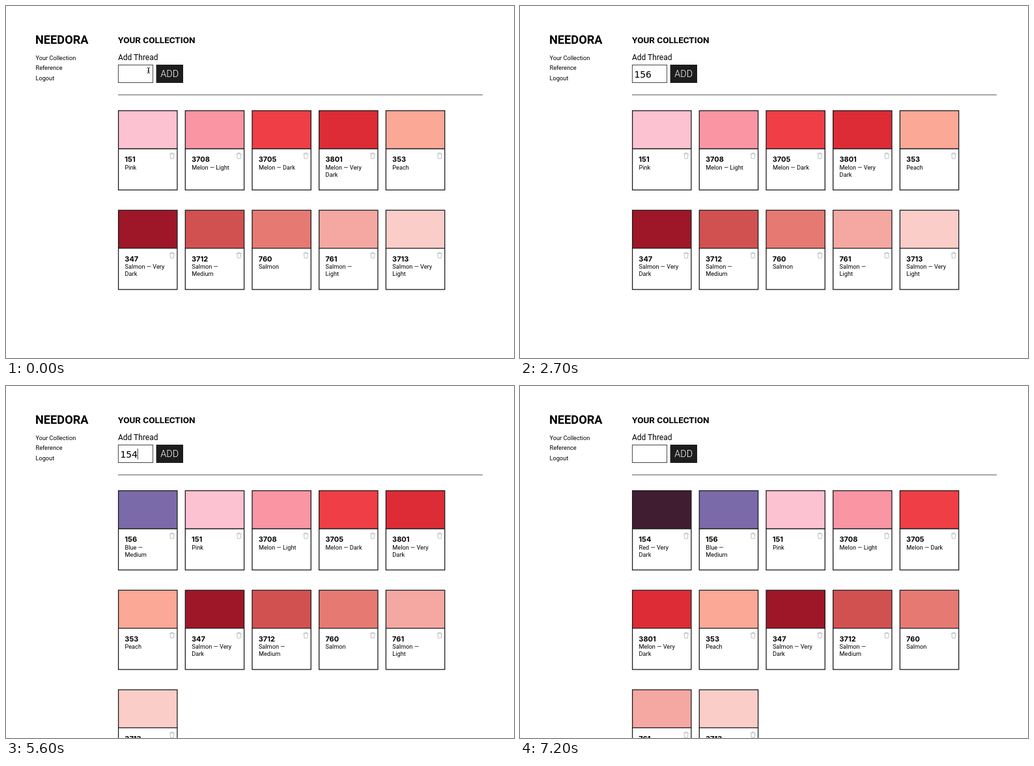
An HTML page for the animation above (7.4 s loop, 780 by 540 pixels).

```html
<!DOCTYPE html>
<html lang="en">
<head>
<meta charset="utf-8">
<title>Your Collection</title>
<style>
  html, body { margin: 0; width: 100%; height: 100%; overflow: hidden; background: #fff; }
  svg { display: block; width: 780px; height: 540px; }
  text { font-family: Roboto, sans-serif; fill: #000; white-space: pre; }
  .brand { font-size: 18.2px; font-weight: 700; }
  .title { font-size: 13.5px; font-weight: 700; }
  .label { font-size: 12px; }
  .small { font-size: 9.2px; }
  .code { font: 700 11px Inter, sans-serif; }
  .add { font-size: 14.4px; font-weight: 300; fill: #fff; }
  .typed { font: 14.8px "DejaVu Sans Mono", monospace; }
  .frame { fill: none; stroke: #1c1c1c; stroke-width: 1.3; }
  .bin { fill: none; stroke: #b0b0b0; stroke-width: .8; }
  .beam { fill: none; stroke: #222; stroke-width: 1; }
</style>
</head>
<body>
<svg viewBox="0 0 780 540">
  <defs>
    <path id="bin" class="bin" d="M79 66.9h8M81.4 66.7v-1.3h3.2v1.3M80.1 67.2l.5 6.9h4.8l.5-6.9"/>
  </defs>

  <text class="brand" x="45" y="58.4">NEEDORA</text>
  <text class="small" x="45.5" y="82.8">Your Collection</text>
  <text class="small" x="45.5" y="98.4">Reference</text>
  <text class="small" x="45.5" y="114">Logout</text>

  <text class="title" x="172" y="57.2">YOUR COLLECTION</text>
  <text class="label" x="172" y="83">Add Thread</text>
  <rect x="172.4" y="90.5" width="53.2" height="27" fill="#fff" stroke="#333" stroke-width=".9"/>
  <rect x="230.6" y="90" width="41.4" height="28" fill="#1d1d1d"/>
  <text class="add" x="251.3" y="109.2" text-anchor="middle">ADD</text>
  <path d="M172 136.3H732" stroke="#444" stroke-width=".9"/>

  <text id="typed" class="typed" x="175.3" y="109.6"></text>
  <rect id="caret" y="96" width="1" height="16.5" fill="#333"/>
  <path id="beam" class="beam" d="M216.6 94.6q2.2 0 2.2 1.4v5.6q0 1.4-2.2 1.4M221 94.6q-2.2 0-2.2 1.4v5.6q0 1.4 2.2 1.4M217.4 99.8h2.8"/>
  <g id="cards"></g>
</svg>
<script>
  const LOOP = 7400, BLINK = 500, DIGIT = 8.9;
  const SHADES = [
    [154, '#411d31', 'Red — Very', 'Dark'],
    [156, '#7b6aa9', 'Blue —', 'Medium'],
    [151, '#fdc2d2', 'Pink'],
    [3708, '#fa95a4', 'Melon — Light'],
    [3705, '#ef3e45', 'Melon — Dark'],
    [3801, '#dd2c35', 'Melon — Very', 'Dark'],
    [353, '#fba896', 'Peach'],
    [347, '#9e1729', 'Salmon — Very', 'Dark'],
    [3712, '#d15150', 'Salmon —', 'Medium'],
    [760, '#e67a73', 'Salmon'],
    [761, '#f5a8a2', 'Salmon —', 'Light'],
    [3713, '#fbcdc9', 'Salmon — Very', 'Light']
  ];
  // time, input value, number of added cards
  const STEPS = [
    [0, '', 0], [400, '', 0],
    [1100, '1', 0], [1500, '15', 0], [1900, '156', 0], [2800, '', 1],
    [3990, '1', 1], [4300, '15', 1], [4500, '154', 1], [5690, '', 2]
  ];

  const byId = id => document.getElementById(id);
  const typed = byId('typed'), caret = byId('caret'), beam = byId('beam');
  const show = (el, on) => el.setAttribute('visibility', on ? 'visible' : 'hidden');

  const cardMarkup = ([code, color, line1, line2 = '']) => `<g>
    <rect x=".6" y=".6" width="90.3" height="58.4" fill="${color}"/>
    <rect class="frame" x=".6" y=".6" width="90.3" height="121.6"/>
    <path class="frame" d="M0 59H91"/>
    <text class="code" x="10.3" y="79.3">${code}</text>
    <text class="small" x="10.5" y="90.5">${line1}</text>
    <text class="small" x="10.5" y="101.5">${line2}</text>
    <use href="#bin"/></g>`;
  byId('cards').innerHTML = SHADES.map(cardMarkup).join('');
  const cards = [...byId('cards').children];

  function layout(added) {
    cards.forEach((card, i) => {
      const slot = i - 2 + added;
      show(card, slot >= 0);
      const x = 172 + (slot % 5) * 102.7, y = 160 + Math.floor(slot / 5) * 152.7;
      card.setAttribute('transform', `translate(${x} ${y})`);
    });
  }

  let current = -1;
  function draw(now) {
    const t = now % LOOP;
    const index = STEPS.findLastIndex(step => step[0] <= t);
    const [start, value, added] = STEPS[index];
    if (index !== current) {
      current = index;
      typed.textContent = value;
      caret.setAttribute('x', 175 + value.length * DIGIT);
      show(beam, index < 2);
      layout(added);
    }
    show(caret, index > 0 && Math.floor((t - start) / BLINK) % 2 === 0);
  }

  function tick() {
    draw(performance.now());
    requestAnimationFrame(tick);
  }
  tick();
</script>
</body>
</html>
```
